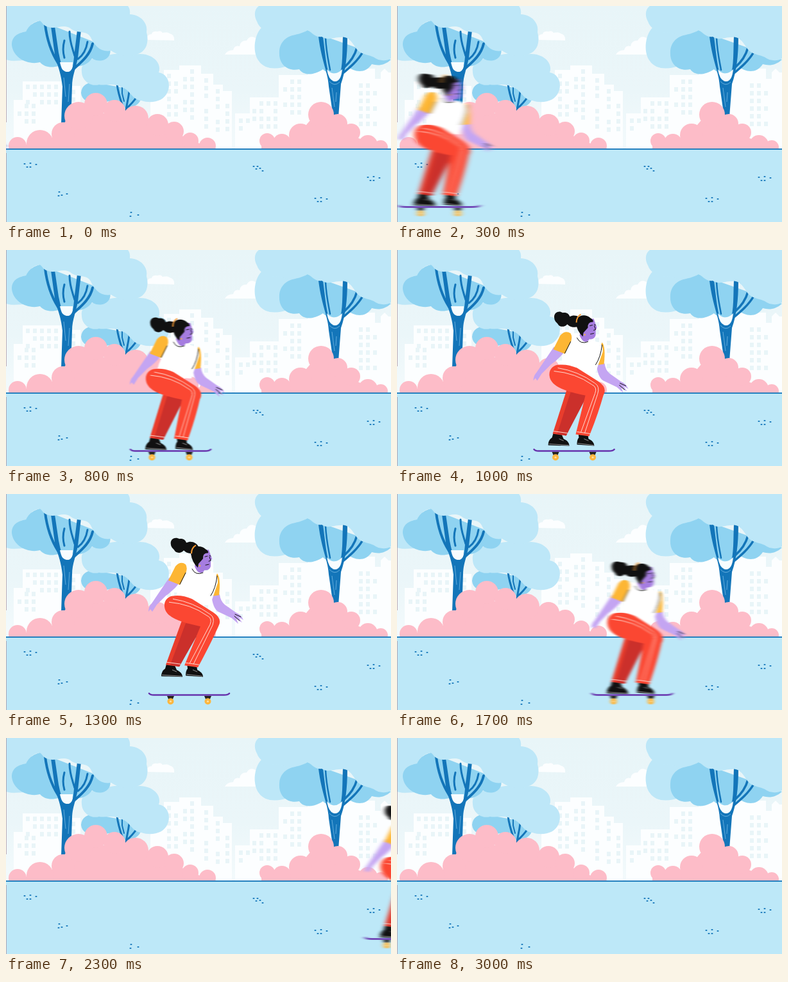
An HTML page that plays this animation: 600 by 338 pixels, repeating every 3100 ms.

```html
<!DOCTYPE html>
<html lang="en">
<head>
<meta charset="utf-8">
<title>Skateboarder in the park</title>
<style>
  html, body { margin: 0; width: 100%; height: 100%; overflow: hidden; background: #eaf6f9; }
  svg { display: block; width: 100%; height: 100%; }
  .light { fill: #bde7f8; }
  .leaf { fill: #8fd3f1; }
  .bark { fill: #1375b9; }
  .twig { fill: none; stroke: #1375b9; stroke-linecap: round; }
  .city { fill: #fcfeff; }
  .pink { fill: #fdbcc8; }
  .skin { fill: #c4a5f2; }
  .face { fill: #a67de0; }
  .sleeve { fill: #fdb634; }
  .red { fill: #fb4732; }
  .line { fill: none; stroke: #111; stroke-width: 1; stroke-linecap: round; }
  .seam { fill: none; stroke: #ffd9d0; stroke-width: 1; }
</style>
</head>
<body>
<svg viewBox="0 0 600 338" preserveAspectRatio="none">
  <defs>
    <linearGradient id="sky" x2="0" y2="1">
      <stop offset="0" stop-color="#e8f5f8"/><stop offset=".6" stop-color="#ebf6f9"/><stop offset="1" stop-color="#f3fafc"/>
    </linearGradient>
    <filter id="blur" filterUnits="userSpaceOnUse" x="-200" y="0" width="1000" height="338" color-interpolation-filters="sRGB">
      <feGaussianBlur id="smear" stdDeviation="0 0"/>
    </filter>
  </defs>

  <rect width="600" height="224" fill="url(#sky)"/>
  <g class="city">
    <path d="M221 53q-3-8 6-9q1-5 9-4q6-2 8 2q8-2 11 1q8 2 7 11zM341 76q4-7 13-7q2-8 10-6q1-9 11-9q5-9 14-4q9 2 9 12q10 2 9 14z"/>
    <path d="M12 224V147H26V118H86V125H116V224zM225 224V140H246V100H270V93H304V106H323V123H338V133H352V224z"/>
    <path d="M357 224V168H380V143H425V108H470V98H575V114H584V104L590 98L596 104H600V224z"/>
  </g>
  <g id="windows" fill="#e9f5f8"></g>

  <!-- distant tree -->
  <path class="leaf" d="M117 136C118 121 133 117 146 121L204 132C218 145 206 158 190 159C174 162 168 146 156 150C136 156 118 150 117 136Z"/>
  <g class="twig" stroke-width="3">
    <path d="M173 122C175 139 179 148 184 163M193 124C192 140 189 149 187 163M206 137C202 148 194 154 188 160" />
    <path d="M181 124V137L184 149" stroke-width="2"/>
  </g>
  <path class="light" d="M118 103C116 88 130 80 147 83C160 72 185 74 200 76C225 71 244 88 238 104C252 106 257 122 252 134C246 150 226 153 211 148C196 147 194 131 180 127C168 120 155 125 145 123C131 127 118 116 118 103Z"/>

  <!-- left tree -->
  <path class="light" d="M0 0H40V85C26 84 13 88 0 84Z"/>
  <path class="leaf" d="M9 61C9 45 22 42 31 40C36 29 45 25 53 23L162 66C166 82 148 91 134 82C123 98 102 97 93 88C80 98 61 98 53 88C34 93 11 81 9 61Z"/>
  <path class="bark" d="M86 184L88 126C86 108 82 96 77 83L70 32H76L82 73C86 91 88 103 96 103C104 103 105 92 106 79L111 38H117L112 81C108 101 103 110 103 126L101 184Z"/>
  <g class="twig" stroke-width="4">
    <path d="M61 29C64 54 71 73 81 89M135 59C131 77 117 88 106 98" />
    <path d="M91 54C88 65 89 74 91 81M99 40C99 56 103 64 107 78M127 56C125 69 119 78 112 83" stroke-width="3"/>
  </g>
  <path d="M84 88C86 96 87 102 95 103C103 103 104 95 104 88" fill="#f7fcfe"/>
  <path d="M90 112L93 142M99 122L97 150" stroke="#74b9e5" fill="none" stroke-width=".8"/>
  <path class="light" d="M0 0H190Q194 5 193 13C209 13 222 27 219 41C223 57 219 70 206 75C190 82 174 77 164 70C147 73 138 62 132 49C126 38 113 43 103 37C91 26 79 37 66 33C58 31 57 26 53 23C43 24 35 31 31 40C17 36 8 33 0 35Z"/>

  <!-- right tree -->
  <path class="light" d="M398 34C385 48 385 75 394 86C404 101 425 99 442 93L470 38Z"/>
  <path class="leaf" d="M426 75C425 56 438 47 451 45C457 39 464 38 470 38L560 70L600 84C590 93 580 94 570 91C560 107 542 103 533 95C522 109 502 108 494 99C476 111 462 107 457 99C440 103 426 92 426 75Z"/>
  <path class="bark" d="M510 174L503 126C502 104 492 88 487 48H494C498 79 499 93 504 108Q512 122 520 108C525 94 524 71 525 48H532C532 80 529 102 522 122L518 174Z"/>
  <g class="twig" stroke-width="3.5">
    <path d="M556 72C548 86 536 96 524 106M547 65C543 80 535 89 527 96"/>
    <path d="M498 50C499 72 503 88 505 100" stroke-width="2.5"/>
  </g>
  <path d="M500 99Q511 112 524 99Q522 119 512 118Q503 117 500 99Z" fill="#f7fcfe"/>
  <path d="M504 118Q512 127 520 119M508 128L512 158M515 135L514 150" stroke="#74b9e5" fill="none" stroke-width=".8"/>
  <path class="light" d="M394 0C387 5 386 15 391 24C395 37 410 43 425 41C438 48 456 46 470 38C477 41 482 50 492 48C502 55 513 48 521 49C532 46 539 56 544 64C552 77 563 75 573 80C581 86 592 87 600 82V0Z"/>

  <g id="bushes" class="pink">
    <path d="M6 224L75 205L93 180L112 165L205 172L290 210L322 224zM398 224V210L450 208L473 180L515 175L545 205L592 224z"/>
  </g>
  <rect y="224" width="600" height="114" fill="#bde8f8"/>
  <rect y="223" width="600" height="1.8" fill="#1375b9"/>
  <g id="pebbles" fill="#1375b9"></g>
  <path d="M.4 0V182M.4 230V338" stroke="#a78f9d" stroke-width=".8"/>

  <g id="skater" filter="url(#blur)">
    <g id="board">
      <path d="M251 316h11l-3 7h-5zM309 316h11l-3 7h-5z" fill="#222"/>
      <path d="M223 312Q225 314.500 230 314.500H340Q346 314.500 348 312" fill="none" stroke="#6733ad" stroke-width="2.500" stroke-linecap="round"/>
      <g fill="#fdb740"><circle cx="256.500" cy="324.500" r="5"/><circle cx="314.500" cy="324.500" r="5"/></g>
      <g fill="#ffe0a0"><circle cx="256.500" cy="324.500" r="1.600"/><circle cx="314.500" cy="324.500" r="1.600"/></g>
    </g>
    <g id="body">
      <g id="backShoe">
        <path d="M250 266L263 268L266 275Q275 279 275 286L242 285Q242 277 248 273Z" fill="#111"/>
        <path d="M243 283L274 285M259 275L266 278" stroke="#ccc" stroke-width=".7"/>
      </g>
      <path id="backLeg" fill="#e93d2c"/>
      <path id="shade" fill="#cb302b"/>
      <g id="frontShoe">
        <path d="M282 266L297 268L298 275Q307 279 307 286L280 284Q280 276 283 273Z" fill="#111"/>
        <path d="M281 282L306 285M291 275L298 278" stroke="#ccc" stroke-width=".7"/>
      </g>
      <path class="skin" d="M320 156L333 157Q334 167 341 173L358 185Q366 188 370 197L362 192L368 201L359 195L362 203L352 194L331 184Q322 179 320 156Z"/>
      <path class="line" d="M357 188L366 192M356 191L364 198" stroke-width=".6"/>
      <path class="sleeve" d="M329 124Q335 131 332 158L318 160Q321 143 329 124Z"/>
      <path d="M280 111L294 112Q300 129 311 120L323 124Q331 127 330 139L318 174L263 171Q266 149 274 138Z" fill="#fff"/>
      <path class="line" d="M329 128Q327 147 319 159"/>
      <path id="frontLeg" class="red"/>
      <path id="seams" class="seam"/>
      <path class="skin" d="M254 131L271 138Q262 150 249 159L235 173L228 184L225 180L222 184Q222 176 227 171Z"/>
      <path class="sleeve" d="M264 113Q272 104 280 110Q284 117 279 126L271 142L253 135Z"/>
      <path class="line" d="M271 141L280 123" stroke-width=".7"/>
      <g id="ponytail" fill="#111">
        <path d="M257 79C255 70 264 66 270 70C276 69 280 72 281 76C289 72 297 76 300 82L294 91C287 95 280 91 277 88C272 94 264 92 262 87C260 85 257 82 257 79Z"/>
      </g>
      <path class="face" d="M300 88L316 87L321 101L319 105L319 113Q317 120 309 119L308 121Q300 128 294 113Z"/>
      <path d="M288 93C289 82 302 78 311 86Q316 89 315 92Q306 92 307 101L300 109L299 115Q290 107 288 93Z" fill="#111"/>
      <path d="M289 93Q289 84 296 80" fill="none" stroke="#f69a32" stroke-width="2"/>
      <path class="line" d="M290 117Q295 128 307 123" stroke-width="1.200"/>
      <path class="line" d="M310 98L314 97M317 96L319 97M317 98L319 104L316 105M311 111L316 110" stroke-width=".8"/>
      <circle cx="302" cy="112" r="1.200" fill="#fdb634"/>
    </g>
  </g>
</svg>
<script>
const LOOP = 3100, STEP = 100, HOME = 285, JUMP = 27;
const $ = id => document.getElementById(id);
const set = (id, name, value) => $(id).setAttribute(name, value);

function add(id, tag, attributes) {
  const node = document.createElementNS('http://www.w3.org/2000/svg', tag);
  for (const name in attributes) node.setAttribute(name, attributes[name]);
  $(id).append(node);
}

// Each block of windows: x, y, columns, rows
for (const [x, y, columns, rows] of [
  [31, 123, 5, 3], [18, 153, 3, 3], [91, 131, 2, 3], [251, 106, 2, 6], [276, 99, 2, 7],
  [309, 113, 1, 7], [327, 130, 1, 6], [342, 141, 1, 5], [384, 149, 4, 4], [432, 115, 3, 5],
  [363, 176, 2, 2], [550, 121, 3, 6]
]) for (let i = 0; i < columns * rows; i++) {
  if ((i * 7 + x) % 6) add('windows', 'rect', {
    x: x + i % columns * 11, y: y + Math.floor(i / columns) * 12, width: 6, height: 7
  });
}

for (const [cx, cy, r] of [
  [18, 219, 14], [53, 215, 21], [89, 200, 18], [113, 172, 22], [140, 154, 18], [169, 164, 17],
  [202, 176, 20], [236, 186, 17], [262, 196, 15], [287, 211, 13], [314, 219, 13],
  [407, 211, 12], [430, 214, 14], [459, 202, 18], [491, 170, 20], [517, 184, 15],
  [538, 198, 14], [564, 217, 15], [584, 221, 11]
]) add('bushes', 'circle', { cx, cy, r });

const tuft = [[0, 0], [9, -1], [18, 1], [4, 5], [9, 5]];
for (const [x, y, spots] of [
  [29, 247, tuft], [564, 268, tuft], [482, 301, tuft],
  [83, 291, [[0, 0], [12, 3], [-1, 6], [4, 5]]],
  [195, 323, [[0, 0], [11, 4], [-1, 6]]],
  [386, 251, [[0, 0], [6, 0], [4, 4], [10, 3], [14, 7]]]
]) for (const [dx, dy] of spots)
  add('pebbles', 'ellipse', { cx: x + dx, cy: y + dy, rx: 1.6, ry: 1 });

// Ride: time, board centre, speed in px per 100 ms
const ride = [
  [0, -84, 50], [500, 156, 42], [800, 256, 17], [1300, 285, 6],
  [1700, 366, 32], [2300, 622, 46], [3100, 990, 46]
];

function rideAt(time) {
  const i = ride.findIndex((key, n) => n && time < key[0]);
  const [t0, x0, v0] = ride[i - 1], [t1, x1, v1] = ride[i];
  const span = (t1 - t0) / 100, s = (time - t0) / (t1 - t0);
  const a = v0 * span, b = v1 * span, gap = x1 - x0;
  const c2 = 3 * gap - 2 * a - b, c3 = a + b - 2 * gap;
  return { x: x0 + s * (a + s * (c2 + s * c3)), speed: (a + s * (2 * c2 + 3 * s * c3)) / span };
}

function poseLegs(crouch) {
  const front = 13 * crouch, back = 4 * crouch;
  set('frontShoe', 'transform', `translate(${front} 0)`);
  set('backShoe', 'transform', `translate(${back} 0)`);
  set('backLeg', 'd', `M274 198L306 201L${270 + back} 270L${249 + back} 267Z`);
  set('shade', 'd', `M280 202L308 203L${270 + back} 270L${256 + back} 267Z`);
  set('frontLeg', 'd', `M263 159C253 159 246 166 247 176C249 195 276 201 303 207
    L${278 + front} 268L${299 + front} 271Q${318 + front / 2} 236 331 207Q338 195 323 185L290 164Q276 158 263 159Z`);
  set('seams', 'd', `M254 169Q288 172 313 190Q322 194 318 204L${286 + front} 265
    M260 164Q292 169 318 188Q326 193 322 205L${292 + front} 266
    M${280 + front} 264L${301 + front} 267M${250 + back} 263L${272 + back} 266`);
}

function draw(now) {
  const time = Math.floor(now % LOOP / STEP) * STEP;
  const { x, speed } = rideAt(time);
  const phase = Math.min(1, Math.max(0, (time - 950) / 650));
  const crouch = 1 - Math.sin(Math.PI * phase);
  const smear = Math.max(0, speed - 8) * 0.1;
  set('skater', 'visibility', x < 690 ? 'visible' : 'hidden');
  if (smear) set('skater', 'filter', 'url(#blur)');
  else $('skater').removeAttribute('filter');
  set('smear', 'stdDeviation', `${smear} 0`);
  set('board', 'transform', `translate(${x - HOME} 0)`);
  set('body', 'transform', `translate(${x - HOME} ${JUMP * crouch})`);
  set('ponytail', 'transform', `translate(${-3 * crouch} ${10 * crouch})`);
  poseLegs(crouch);
}

const start = performance.now();
function tick() {
  draw(performance.now() - start);
  requestAnimationFrame(tick);
}
tick();
</script>
</body>
</html>
```
